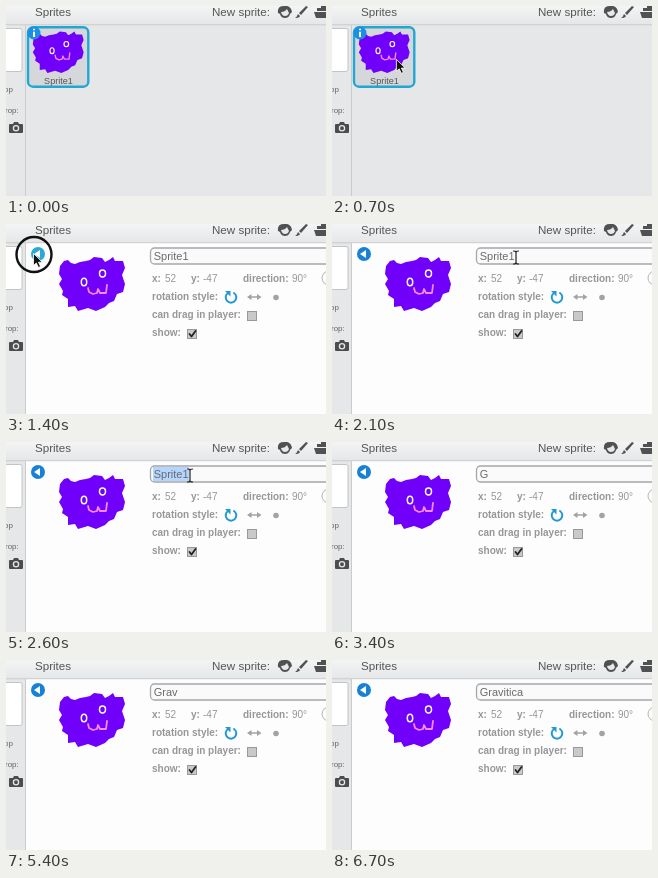
An HTML page that plays this animation: 320 px wide and 190 px high, repeating every 7 s.

```html
<!DOCTYPE html>
<html lang="en">
<head>
<meta charset="utf-8">
<title>Renaming a sprite</title>
<style>
  html, body { margin: 0; width: 100%; height: 100%; overflow: hidden; }
  svg { display: block; width: 100vw; height: 100vh; font-family: "Liberation Sans", Arial, sans-serif; }
  .title { font-size: 11.6px; fill: #555; }
  .side { font-size: 8px; fill: #666; }
  .info { font-size: 10px; fill: #969799; }
  .info .key { font-weight: bold; }
  .line { fill: none; stroke-linecap: round; stroke-linejoin: round; }
</style>
</head>
<body>
<svg viewBox="0 0 320 190">
  <defs>
    <linearGradient id="bar" x2="0" y2="1">
      <stop stop-color="#f3f4f4"/><stop offset="1" stop-color="#e5e6e8"/>
    </linearGradient>
    <g id="blob">
      <path fill="#7000fa" d="M54 42L58 37 62 36 65 39 69 40 74 38 80 37 84 36 88 33 96 34 99 38 103 36 107 33 109 37 117 37 119 44 116 51 119 60 117 68 111 70 108 77 103 79 99 83 90 87 82 84 72 87 69 82 62 83 62 75 56 71 57 67 53 60 56 55 53 50Z"/>
      <g class="line" stroke="#fff" stroke-width="1.5">
        <ellipse cx="78" cy="58" rx="2.7" ry="3.8"/>
        <ellipse cx="96.5" cy="49.5" rx="3" ry="3.4"/>
      </g>
      <path class="line" stroke="#f58af0" stroke-width="1.8" d="M82 64L83 68 87 70 91 69 92 65 94 69 100 69 101 61"/>
    </g>
  </defs>

  <rect width="320" height="190" fill="#e6e7e9"/>
  <rect width="320" height="19" fill="url(#bar)"/>
  <path d="M0 18.8H320M19.5 19V190" stroke="#c9cbcd"/>
  <rect x="-5" y="22.5" width="21" height="43" rx="2" fill="#fff" stroke="#c2c4c6"/>
  <g class="side">
    <text x="-2" y="86">op</text>
    <text x="-1" y="107">rop:</text>
  </g>
  <path fill="#4b4c4e" d="M4 118H7L8 116H12L13 118H16Q17 118 17 119V126Q17 127 16 127H4Q3 127 3 126V119Q3 118 4 118Z"/>
  <circle cx="10" cy="122.3" r="2.6" fill="#4b4c4e" stroke="#e6e7e9" stroke-width="1.3"/>

  <text class="title" x="29" y="10">Sprites</text>
  <text class="title" x="206" y="10">New sprite:</text>
  <g fill="#505153">
    <path d="M272 7Q271 0 278 0Q285 -1 286 6L284 8Q283 12 279 12Q275 12 274 8Z"/>
    <path fill="#e9e9e9" d="M275 6Q279 6 281 3L283 7Q282 10 279 10Q276 10 275 6Z"/>
    <path d="M300 0L302 1 295 9 293 7ZM292 8L294 10Q293 12 289 12Q291 11 292 8Z"/>
    <path d="M308 6H320V12H310ZM311 2H315V0H320V5H311Z"/>
  </g>

  <g id="card">
    <rect x="22" y="21.3" width="60.3" height="59.4" rx="5" fill="#d5d7da" stroke="#22a7d5" stroke-width="2.4"/>
    <use href="#blob" transform="translate(-14 0) scale(.77)"/>
    <text x="52.5" y="77.5" font-size="9.1" fill="#555" text-anchor="middle">Sprite1</text>
    <circle id="badge" cx="28" cy="27" r="6.5"/>
    <path d="M28 22.7V24.3M28 25.8V31" stroke="#fff" stroke-width="2"/>
  </g>

  <g id="panel">
    <rect x="20" y="19.3" width="300" height="171" fill="#fdfdfd"/>
    <circle id="back" cx="32" cy="30" r="7"/>
    <path d="M28 30L34 26V34Z" fill="#fff"/>
    <use href="#blob"/>
    <rect x="144.5" y="24" width="190" height="16" rx="4" fill="#fafafa" stroke="#a6a7a9" stroke-width="1.3"/>
    <rect id="select" x="147" y="25" width="36" height="14" fill="#b4d5fe"/>
    <text id="name" x="147.7" y="35.5" font-size="11" fill="#6a6b6d"></text>
    <path id="caret" d="M0 26V38" stroke="#555"/>
    <g class="info">
      <text class="key" x="146" y="58">x:</text><text x="159" y="58">52</text>
      <text class="key" x="185" y="58">y:</text><text x="197" y="58">-47</text>
      <text class="key" x="237" y="58">direction:</text><text x="286" y="58">90°</text>
      <text class="key" x="146" y="76">rotation style:</text>
      <text class="key" x="146" y="94">can drag in player:</text>
      <text class="key" x="146" y="112">show:</text>
    </g>
    <circle cx="323" cy="54" r="7" fill="none" stroke="#b5b6b8"/>
    <path class="line" stroke="#2199d3" stroke-width="2" d="M222 69A5.3 5.3 0 1 0 228 69"/>
    <path fill="#2199d3" d="M219 67H224.5V72.5Z"/>
    <path d="M244 73H253" stroke="#a2a3a5" stroke-width="1.5"/>
    <path d="M241 73L245.5 70V76ZM255.500 73L251 70V76Z" fill="#a2a3a5"/>
    <circle cx="270" cy="73.500" r="2.8" fill="#a2a3a5"/>
    <g fill="#c8c9cb" stroke="#98999b">
      <rect x="241.5" y="87.500" width="9" height="9"/>
      <rect x="181.5" y="105.500" width="9" height="9"/>
    </g>
    <path class="line" d="M183.500 110L185.500 112.500 189.500 107" stroke="#222" stroke-width="1.8"/>
  </g>

  <circle id="ring" cx="28" cy="30.500" r="17.500" fill="none" stroke="#111" stroke-width="2.4"/>
  <path id="arrow" d="M0 0V12L2.800 9.500 5 14 7 13 5 8.700H8.800Z" fill="#111" stroke="#fff" stroke-width=".8"/>
  <path id="beam" class="line" d="M-2.500 -6.500Q0 -6.500 0 -5Q0 -6.500 2.500 -6.500M0 -5V5M-2.500 6.500Q0 6.500 0 5Q0 6.500 2.500 6.500" stroke="#222" stroke-width="1.200"/>
</svg>
<script>
const LOOP = 7000, STEP = 100;
const el = id => document.getElementById(id);
const [card, panel, badge, back, select, label, caret, ring, arrow, beam] =
  ["card", "panel", "badge", "back", "select", "name", "caret", "ring", "arrow", "beam"].map(el);
const keyTimes = [3400, 3700, 4000, 4400, 5700, 5800, 6000, 6100, 6300];
const word = "Gravitica";

const within = (t, a, b) => t >= a && t < b;
const show = (node, on) => node.setAttribute("visibility", on ? "visible" : "hidden");
const place = (node, x, y) => node.setAttribute("transform", `translate(${x} ${y})`);
const progress = (t, a, b) => Math.min(1, Math.max(0, (t - a) / (b - a)));
const mix = (a, b, k) => a + (b - a) * k;

function pointer(t) {
  if (t < 1700) {
    const k = 1 - (1 - progress(t, 100, 1200)) ** 2;
    return [mix(206, 27.5, k), mix(145, 29.5, k)];
  }
  const k = 1 - (1 - progress(t, 1600, 2100)) ** 2;
  return [mix(27.5, 184, k), mix(29.5, 33.5, k)];
}

function draw(t) {
  const open = t >= 1400;
  show(card, !open);
  show(panel, open);
  badge.setAttribute("fill", within(t, 1100, 1400) ? "#2aa9d6" : "#1b8fe0");
  back.setAttribute("fill", t < 1700 ? "#2aa9d6" : "#1781d8");

  const typed = keyTimes.filter(k => t >= k).length;
  label.textContent = typed ? word.slice(0, typed) : "Sprite1";
  show(select, within(t, 2500, 3400));
  show(caret, within(t, 4400, 4600) || within(t, 5000, 5300) || within(t, 6300, 6600));
  place(caret, Math.floor(147.7 + label.getComputedTextLength()) + .5, 0);

  const [x, y] = pointer(t);
  const overField = x > 144;
  show(ring, within(t, 1400, 1700));
  show(arrow, within(t, 100, 1700) || (t < 3400 && t >= 1700 && !overField));
  show(beam, within(t, 1700, 3400) && overField);
  place(arrow, x, y);
  place(beam, x, y);
}

function tick(now) {
  draw(Math.floor(now % LOOP / STEP) * STEP);
  requestAnimationFrame(tick);
}
tick(performance.now());
</script>
</body>
</html>
```
